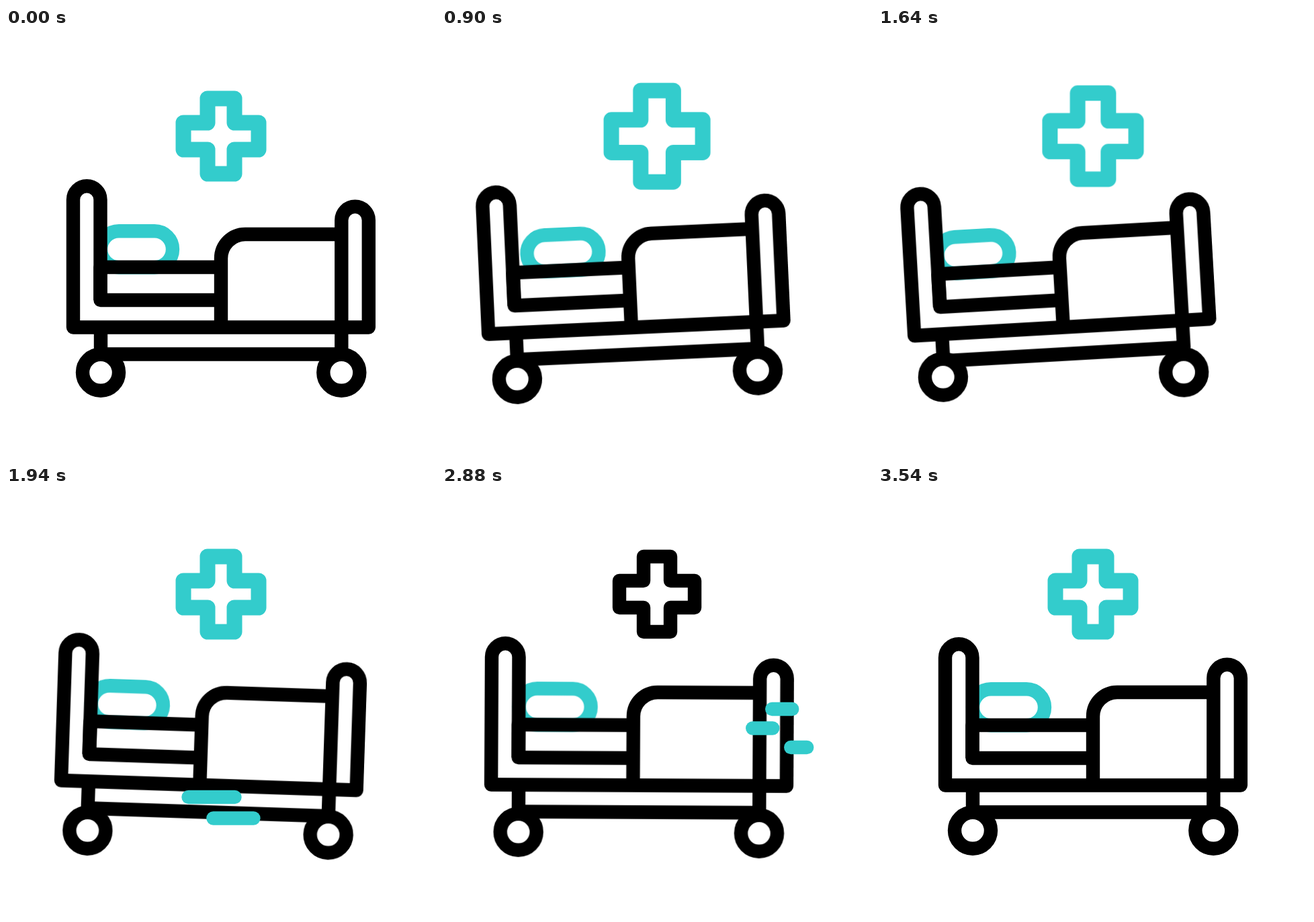
Write an HTML page that moves like this. It is 640x640 px and loops after 3600 ms.

```html
<!DOCTYPE html>
<html lang="en">
<head>
<meta charset="utf-8">
<title>Hospital bed</title>
<style>
  :root { --teal: #33cccc; --sway: cubic-bezier(.364, 0, .636, 1); }
  html, body { margin: 0; width: 100%; height: 100%; overflow: hidden; background: #fff; }
  svg { display: block; width: 100%; height: 100%; }
  path, rect, circle { fill: none; stroke: #000; stroke-width: 20.4px; stroke-linejoin: round; }
  .body, .wheels, .pillow, .blanket { animation: 3600ms var(--sway) infinite; }

  .body { transform-origin: 320px 445.5px; animation-name: body; }
  .wheels { transform-origin: 320px 463px; animation-name: wheels; }
  .pillow { stroke: var(--teal); animation-name: pillow; }
  .blanket { animation-name: blanket; }
  .blanket, circle { fill: #fff; }
  .cross {
    stroke: var(--teal);
    vector-effect: non-scaling-stroke;
    transform-origin: 320px 161px;
    animation: pulse 3600ms var(--sway) infinite, tint 3600ms step-end infinite;
  }
  .streaks path {
    stroke: var(--teal);
    stroke-linecap: round;
    animation: streak 3600ms linear infinite;
    animation-delay: calc(var(--start) - 3600ms);
  }

  @keyframes body {
    0%, 98.33%, 100% { transform: translateX(0) rotate(0deg); }
    13.61% { transform: translateX(37px) rotate(4.1deg); }
    29.44% { transform: translateX(-46px) rotate(-4.1deg); }
    38.33%, 53.19%, 68.06%, 82.92% { transform: translateX(-17.4px) rotate(2.03deg); }
    45.78%, 60.64%, 75.5%, 90.36% { transform: translateX(-46.2px) rotate(-3.27deg); }
  }
  @keyframes wheels {
    0%, 98.33%, 100% { transform: translate(0, 0) rotate(0deg); }
    13.61% { transform: translate(37px, 3.2px) rotate(3.3deg); }
    29.44% { transform: translate(-46px, 3.2px) rotate(-3.3deg); }
    38.33%, 53.19%, 68.06%, 82.92% { transform: translate(-18.1px, 3.2px) rotate(1.05deg); }
    45.78%, 60.64%, 75.5%, 90.36% { transform: translate(-45.2px, 3.2px) rotate(-1.15deg); }
  }
  @keyframes pillow {
    0%, 13.61%, 36.11%, 100% { transform: translateX(0); }
    25.83% { transform: translateX(22px); }
  }
  @keyframes blanket {
    0%, 98.33%, 100% { transform: translateX(0); }
    13.61%, 38.33%, 53.19%, 68.06%, 82.92% { transform: translateX(-14px); }
    29.44% { transform: translateX(-5.5px); }
    45.78%, 60.64%, 75.5%, 90.36% { transform: translateX(2px); }
  }
  @keyframes pulse {
    0%, 14.03%, 32.44%, 50.83%, 100% { transform: scale(1); }
    23.28%, 41.67% { transform: scale(1.235); }
  }
  @keyframes tint {
    0%, 85% { stroke: var(--teal); stroke-width: 23px; }
    63.89% { stroke: #000; stroke-width: 20.4px; }
  }
  /* The head runs ahead, then the tail catches up. */
  @keyframes streak {
    0% { stroke-dasharray: 0 2; stroke-dashoffset: 0; opacity: 1; }
    4.07% { stroke-dasharray: .5 2; stroke-dashoffset: 0; }
    8.15% { stroke-dasharray: .5 2; stroke-dashoffset: -.5; }
    12.22% { stroke-dasharray: 0 2; stroke-dashoffset: -1; opacity: 1; }
    12.23%, 100% { stroke-dasharray: 0 2; stroke-dashoffset: -1; opacity: 0; }
  }
</style>
</head>
<body>
<svg viewBox="0 0 640 640">
  <path class="cross" d="M300 105h40v36h36v40h-36v36h-40v-36h-36v-40h36z"/>

  <g class="body">
    <rect class="pillow" x="141" y="302.3" width="107" height="54" rx="27"/>
    <path d="M320 356H140.5V405H320"/>
    <path class="blanket" d="M505 307H356a36 36 0 0 0-36 36V445.5"/>
    <path d="M140.5 405V255.5a20.25 20.25 0 0 0-40.5 0V445.5H539.8V286a20.25 20.25 0 0 0-40.5 0V485.5H141V445.5"/>
  </g>

  <g class="wheels">
    <circle cx="141" cy="512.8" r="27"/>
    <circle cx="499.3" cy="512.8" r="27"/>
  </g>

  <g class="streaks">
    <g style="--start: 1140ms">
      <path pathLength="1" d="M73.5 376H179.5"/>
      <path pathLength="1" d="M109 408H201"/>
    </g>
    <g style="--start: 1720ms">
      <path pathLength="1" d="M236.5 463H374.5"/>
      <path pathLength="1" d="M278 494.5H398"/>
    </g>
    <g style="--start: 2660ms">
      <path pathLength="1" d="M476 332H536"/>
      <path pathLength="1" d="M447 360.5H507"/>
      <path pathLength="1" d="M507 389H555"/>
    </g>
  </g>
</svg>
</body>
</html>
```
